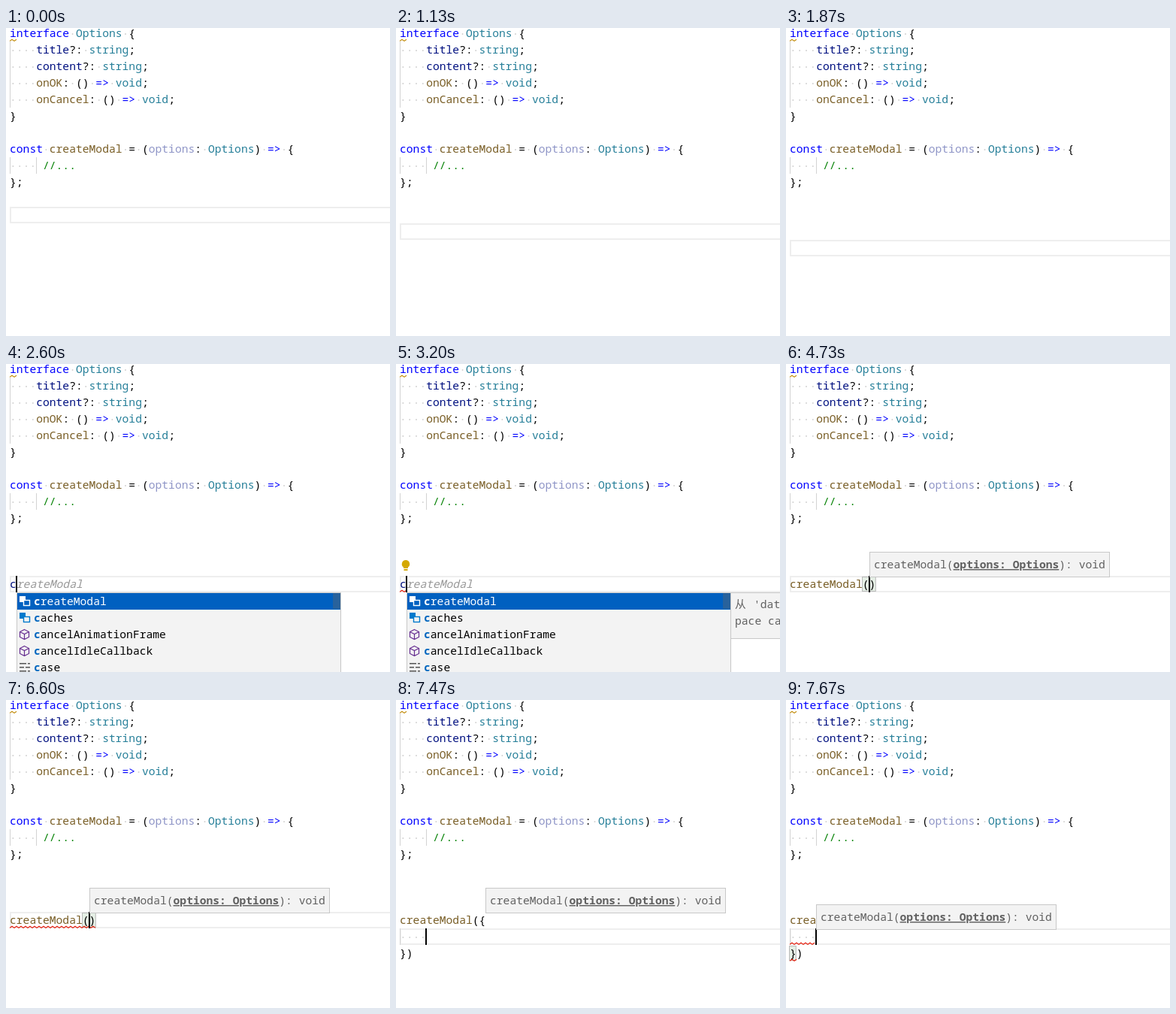
Write an HTML page that moves like this. It is 511x410 px and loops after 8 s.

```html
<!DOCTYPE html>
<html lang="en">
<head>
<meta charset="utf-8">
<title>Code completion</title>
<style>
html, body { margin: 0; width: 100%; height: 100%; overflow: hidden; background: #fff; }
svg { display: block; }
text { font: 14.66px "Noto Sans Mono", "Noto Sans CJK SC", monospace; }
.keyword { fill: #00f; }
.type { fill: #267f99; }
.func { fill: #795e26; }
.name { fill: #001080; }
.unused { fill: #001080; opacity: .44; }
.comment { fill: #008000; }
.ghost { fill: #999; font-style: italic; }
.hint { fill: #616161; }
.bold { font-weight: 700; }
.match { fill: #0066bf; font-weight: 700; }
.white { fill: #fff; }
.under { text-decoration: underline; }
.dot { fill: #d2d2d2; }
.guide { fill: #d3d3d3; }
.current { fill: none; stroke: #eee; stroke-width: 2; }
.panel { fill: #f3f3f3; stroke: #c8c8c8; }
.bracket { fill: rgba(0, 100, 0, .1); stroke: #b9b9b9; }
.wave { fill: none; stroke: #e51400; stroke-width: 1.15; }
.warn { stroke: #bf8803; }
</style>
</head>
<body>
<svg id="stage" width="511" height="410" viewBox="0 0 511 410"></svg>
<script>
const LOOP = 8000, LEFT = 5, CHAR = 8.797, LINE = 22;
const stage = document.getElementById('stage');
const layers = [];

const lineTop = row => row * LINE - 4;
const base = row => row * LINE + 12;
const col = n => LEFT + n * CHAR;

const text = (x, y, str, cls = '') => `<text x="${x}" y="${y}" class="${cls}">${str.replace('>', '&gt;')}</text>`;
const rect = (x, y, w, h, attrs = '') => `<rect x="${x}" y="${y}" width="${w}" height="${h}" ${attrs}/>`;

function show(from, to, ...parts) {
  const g = document.createElementNS('http://www.w3.org/2000/svg', 'g');
  g.innerHTML = parts.join('');
  stage.append(g);
  layers.push({ g, from, to });
}

const TOKENS = new RegExp([
  '(?<comment>//.*)', '(?<keyword>interface|const|=>)', '(?<type>Options|string|void)',
  '(?<func>onOK|onCancel|createModal)', '(?<name>title|content)', '(?<unused>options)',
  '(?<dot> )', '(?<plain>[^\\s\\w]+)'
].join('|'), 'g');

function code(row, source, start = 0) {
  return [...source.matchAll(TOKENS)].map(m => {
    const kind = Object.keys(m.groups).find(k => m.groups[k]);
    const x = col(start + m.index);
    return kind === 'dot'
      ? `<circle class="dot" cx="${x + CHAR / 2}" cy="${base(row) - 4}" r="1"/>`
      : text(x, base(row), m[0], kind);
  }).join('');
}

function wave(row, from, to, cls = '') {
  const end = col(to), bottom = lineTop(row) + LINE;
  let d = '';
  for (let x = col(from), i = 0; x <= end + .5; x += 3, i++) d += `${i ? 'L' : 'M'}${x} ${bottom - (i % 2 ? 2.8 : 0.6)}`;
  return `<path class="wave ${cls}" d="${d}"/>`;
}

const guide = (row, n, rows = 1) => rect(Math.floor(col(n)), lineTop(row), 1, rows * LINE, 'class="guide"');
const current = row => rect(6, lineTop(row) + 1, 520, LINE - 2, 'class="current"');
const bracket = (row, n) => rect(Math.round(col(n)) - .5, lineTop(row) + 1.5, 8.8, LINE - 3, 'class="bracket"');
const caret = (x, row) => rect(x, lineTop(row), 2, LINE);

const hint = (x, y) => rect(x + .5, y + .5, 319, 33, 'class="panel"') +
  text(x + 6, y + 22, 'createModal(', 'hint') +
  text(x + 6 + 12 * CHAR, y + 22, 'options: Options', 'hint bold under') +
  text(x + 6 + 28 * CHAR, y + 22, '): void', 'hint');

const icons = {
  value: (y, color, back) => rect(18, y - 7, 8, 8, `fill="${color}"`) +
    rect(23.5, y - 1.5, 8, 7, `fill="${back}" stroke="${color}" stroke-width="1.4"`),
  method: y => `<path d="M24.5 ${y - 6.5}l6 3v7l-6 3-6-3v-7zm-6 3l6 3 6-3m-6 3v7" fill="none" stroke="#652d90" stroke-width="1.2"/>`,
  keyword: y => [-5, 0, 5].map((d, i) => rect(18, y + d - 1, i === 1 ? 6 : 9, 1.5, 'fill="#555"') +
    rect(i === 1 ? 26 : 29, y + d - 1, i === 1 ? 6 : 3, 1.5, 'fill="#555"')).join('')
};

function suggestions() {
  const items = [['createModal', 'value'], ['caches', 'value'], ['cancelAnimationFrame', 'method'],
    ['cancelIdleCallback', 'method'], ['case', 'keyword']];
  const rows = items.map(([word, icon], i) => {
    const mid = 316 + i * LINE, first = i === 0;
    return icons[icon](mid, first ? '#fff' : '#007acc', first ? '#0060c0' : '#f3f3f3') +
      text(37, mid + 5, word[0], first ? 'white bold' : 'match') +
      text(37 + CHAR, mid + 5, word.slice(1), first ? 'white' : '');
  });
  return rect(14.5, 304.5, 431, 120, 'class="panel"') + rect(15, 305, 430, 22, 'fill="#0060c0"') +
    rect(435, 305, 10, 21, 'fill="#646464" opacity=".4"') + rows.join('');
}

const details = rect(445.5, 304.5, 80, 61, 'class="panel"') +
  text(451, 325, '从', 'hint') + text(476, 325, "'dat", 'hint') + text(451, 347, 'pace ca', 'hint');

const bulb = '<path d="M13 261a5.3 5.3 0 0 0-3 9.6v1.4h6v-1.4a5.3 5.3 0 0 0-3-9.6zM10.5 273h5v2h-5z" fill="#d4a800"/>';

// Current line
show(0, 670, current(11));
show(670, 1400, current(12));
show(1400, 7470, current(13));
show(7470, LOOP, current(14));

// Fixed code
show(0, LOOP,
  guide(1, 0, 4), guide(8, 0), guide(8, 4),
  ...['interface Options {', '    title?: string;', '    content?: string;', '    onOK: () => void;',
    '    onCancel: () => void;', '}', '', 'const createModal = (options: Options) => {',
    '    \u00a0//...', '};'].map((line, row) => code(row, line)),
  wave(0, 0, 1, 'warn'));

// Bracket pairs
show(4470, 7130, bracket(13, 11), bracket(13, 12));
show(7130, 7470, bracket(13, 12), bracket(13, 13));
show(7600, LOOP, bracket(13, 12), bracket(15, 0));

// Typed code
show(2270, 3800, text(col(0), base(13), 'c', 'name'));
show(2600, 3800, text(col(1), base(13), 'reateModal', 'ghost'));
show(3800, 4070, text(col(0), base(13), 'cr', 'name'), text(col(2), base(13), 'eateModal', 'ghost'));
show(4070, 4200, text(col(0), base(13), 'createModal', 'name'));
show(4200, LOOP, code(13, 'createModal'));
show(4470, 7130, code(13, '()', 11));
show(7130, 7470, code(13, '({})', 11));
show(7470, LOOP, code(13, '({', 11), guide(14, 0), code(14, '    '), code(15, '})'));

// Error underlines
show(2670, 3800, wave(13, 0, 1));
show(3800, 4730, wave(13, 0, 2));
show(5070, 7130, wave(13, 0, 13));
show(7130, 7470, wave(13, 0, 15));
show(7600, LOOP, wave(13, 12, 13), wave(14, 0, 4), wave(15, 0, 1));

// Caret: x, row, from, to
[[5, 11, 470, 670], [5, 12, 670, 1130], [5, 13, 1400, 1870], [13, 13, 2270, 2730], [13, 13, 3200, 3330],
  [22, 13, 3800, 4070], [101, 13, 4070, 4470], [110, 13, 4470, 5000], [110, 13, 5600, 6070],
  [110, 13, 6600, 7070], [119, 13, 7130, 7470], [39, 14, 7470, LOOP]
].forEach(([x, row, from, to]) => show(from, to, caret(x, row)));

// Popups
show(2530, 4070, suggestions());
show(3070, 4070, details);
show(2930, 3600, bulb);
show(4600, 7130, hint(111, 250));
show(7130, 7530, hint(119, 250));
show(7530, LOOP, hint(40, 272));

const start = performance.now();
function render() {
  const t = (performance.now() - start) % LOOP;
  for (const { g, from, to } of layers) g.style.display = t >= from && t < to ? '' : 'none';
  requestAnimationFrame(render);
}
render();
</script>
</body>
</html>
```
